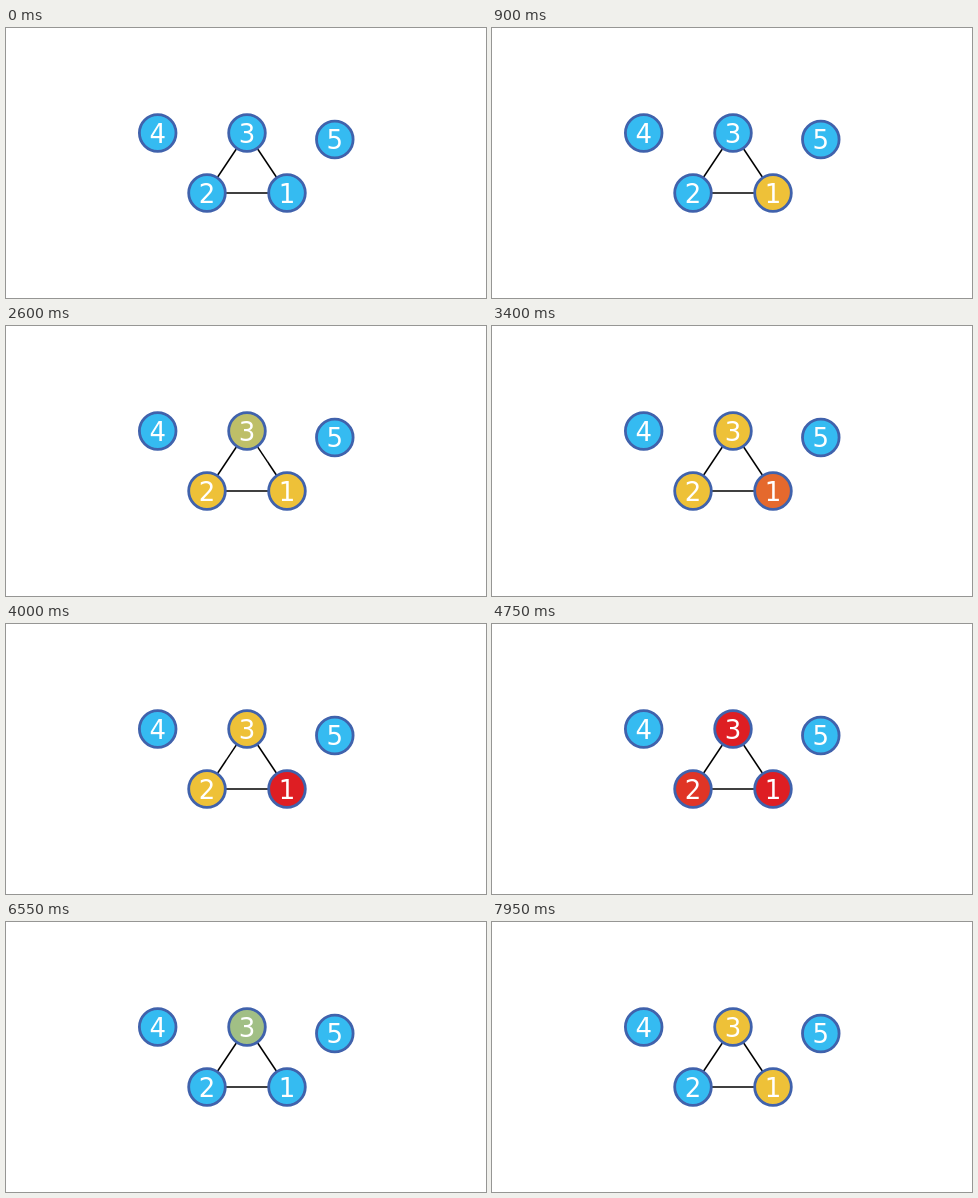
An HTML page that plays this animation: 480 by 270 pixels, repeating every 8 s.

```html
<!DOCTYPE html>
<html lang="en">
<head>
<meta charset="utf-8">
<title>Node states</title>
<style>
  :root { --idle: #35bbf1; --wait: #eec138; --busy: #de1e23; }
  html, body { margin: 0; width: 100%; height: 100%; overflow: hidden; background: #fff; }
  svg { display: block; width: 100vw; height: 100vh; }
  line { stroke: #000; stroke-width: 1.5; }
  circle { fill: var(--idle); stroke: #4062ac; stroke-width: 2.8; }
  text { fill: #fff; font: 26px "DejaVu Sans", sans-serif; text-anchor: middle; }
  #n1 circle { animation: first 8s linear infinite; }
  #n2 circle { animation: second 8s linear infinite; }
  #n3 circle { animation: third 8s linear infinite; }

  @keyframes first {
    0%, 2.5% { fill: var(--idle); }
    11.25%, 37.8% { fill: var(--wait); }
    46.5%, 71.9% { fill: var(--busy); }
    80.6%, 88.5% { fill: var(--idle); }
    97.25%, 100% { fill: var(--wait); }
  }
  @keyframes second {
    0%, 14.25% { fill: var(--idle); }
    23%, 51.9% { fill: var(--wait); }
    60.6%, 65.8% { fill: var(--busy); }
    74.6%, 100% { fill: var(--idle); }
  }
  @keyframes third {
    0%, 26% { fill: var(--idle); }
    34.8%, 50.6% { fill: var(--wait); }
    59.4%, 64.3% { fill: var(--busy); }
    73.1%, 76.8% { fill: var(--idle); }
    85.5%, 100% { fill: var(--wait); }
  }
</style>
</head>
<body>
<svg viewBox="0 0 480 270">
  <line x1="201" y1="165" x2="281" y2="165"/>
  <line x1="201" y1="165" x2="241" y2="105"/>
  <line x1="241" y1="105" x2="281" y2="165"/>
  <g id="n1" transform="translate(281 165)"><circle r="18.3"/><text y="9.5">1</text></g>
  <g id="n2" transform="translate(201 165)"><circle r="18.3"/><text y="9.5">2</text></g>
  <g id="n3" transform="translate(241 105)"><circle r="18.3"/><text y="9.5">3</text></g>
  <g id="n4" transform="translate(151.7 105)"><circle r="18.3"/><text y="9.5">4</text></g>
  <g id="n5" transform="translate(328.8 111.5)"><circle r="18.3"/><text y="9.5">5</text></g>
</svg>
</body>
</html>
```
